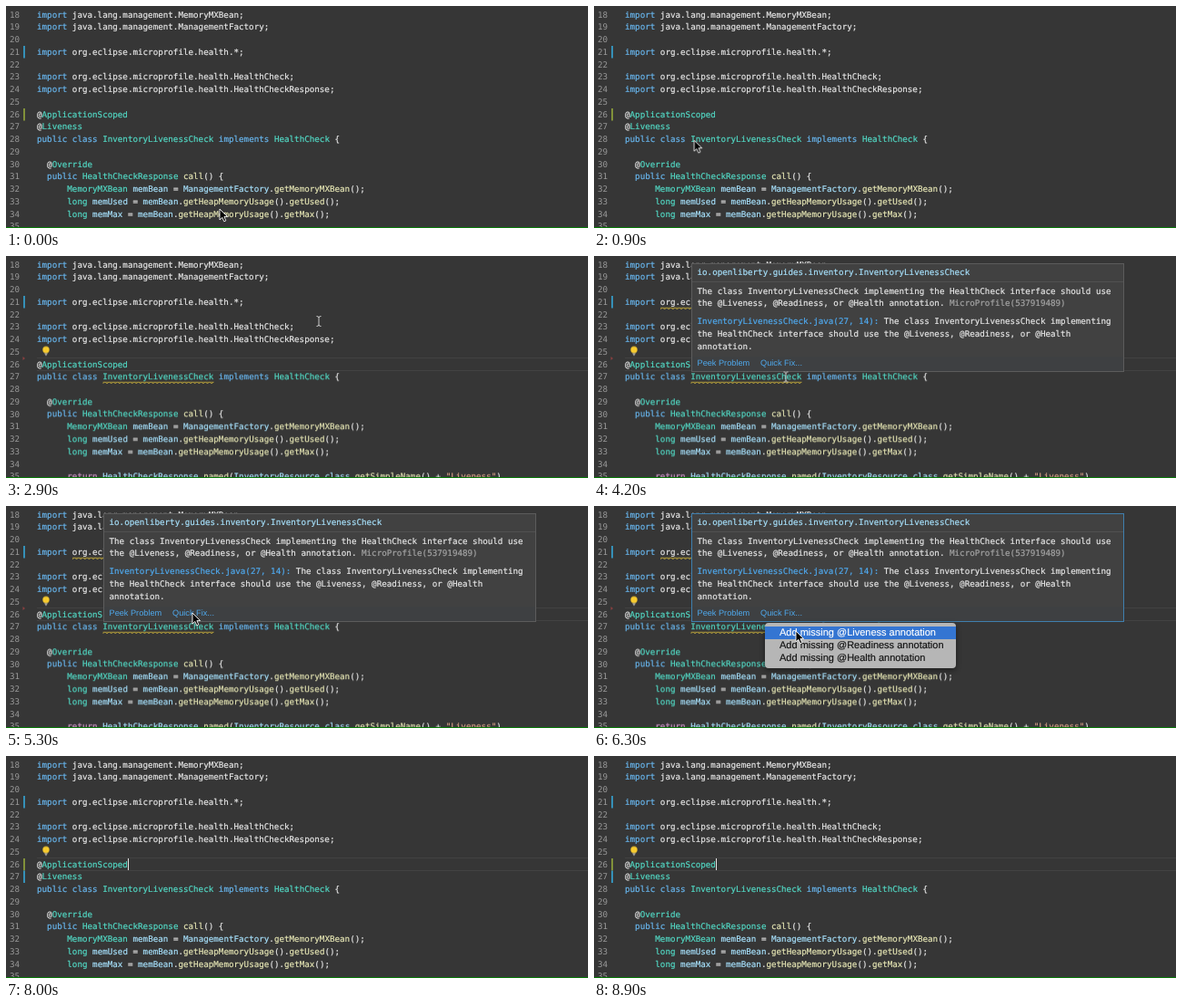
Recreate the animation shown at these times as an HTML page. Size 640x245 px, loop 9000 ms.

```html
<!DOCTYPE html>
<html lang="en">
<head>
<meta charset="utf-8">
<title>Quick fix in a Java editor</title>
<style>
  html, body { margin: 0; width: 100%; height: 100%; overflow: hidden; background: #363636; }
  #stage { position: relative; width: 100%; height: 100%; overflow: hidden; text-rendering: geometricPrecision; }
  pre, svg, .tip, .menu, .edge { position: absolute; margin: 0; }
  svg { left: 0; top: 0; }
  pre { font: 9.22px/13.75px "DejaVu Sans Mono", monospace; color: #e6e6e6; -webkit-text-stroke: .2px; }
  .code { left: 34px; top: 3.5px; }
  .nums { left: 4px; top: 3.5px; color: #999; -webkit-text-stroke: 0; }
  .edge { left: 0; right: 0; bottom: 0; height: 1px; background: #067a06; }

  /* syntax: keyword, type, method, variable, string, control */
  b, i, u, s, q, .ctrl { font: inherit; text-decoration: none; quotes: none; }
  b { color: #68b6ee; }
  i { color: #52d8c4; }
  u { color: #e6e6b4; }
  s { color: #a6e0fb; }
  q { color: #dba388; }
  .ctrl { color: #cf94c8; }

  .tip { left: 107px; top: 8px; width: 474px; height: 118px; background: #414141; border: 1px solid #5c5c5c; }
  .tip pre { left: 5.5px; }
  .tip hr { position: absolute; left: 0; width: 100%; margin: 0; border: 0; height: 1px; background: #515151; }
  .tip b { color: #4fa9ee; }
  .tip em { font-style: normal; color: #a4a4a4; }
  .bar { position: absolute; left: 0; right: 0; bottom: 0; height: 16px; background: #3e4042; font: 9.2px/15.4px "Liberation Sans", Arial, sans-serif; color: #4fa9ee; }
  .bar span { position: absolute; left: 5.5px; }
  .bar span + span { left: 75px; }

  .menu { left: 188px; top: 129px; width: 210px; height: 46px; padding: 3.5px 0 0; border-radius: 4px; background: #b6b6b6; box-shadow: 0 2px 6px #0007; font: 11px/14.4px "Liberation Sans", Arial, sans-serif; color: #111; -webkit-text-stroke: .15px; }
  .menu div { padding-left: 16px; }
  .menu .pick { background: #3475d2; color: #fff; }

  /* every track shares the same nine-second clock */
  .track { animation: 9s step-end infinite; }
  .body { animation-name: body; }
  @keyframes body { 0%, 77.77% { transform: none } 25.55% { transform: translateY(-13.75px) } }
  .note { animation-name: note; }
  @keyframes note { 0%, 77.77% { opacity: 1 } 23.33% { opacity: 0 } }
  .added { animation-name: added; }
  @keyframes added { 0% { opacity: 0 } 77.77%, 100% { opacity: 1 } }
  .mark { animation-name: mark; }
  @keyframes mark { 0%, 77.77% { opacity: 1 } 25.55% { opacity: 0 } }
  .removed { animation-name: removed; }
  @keyframes removed { 0%, 77.77% { opacity: 0 } 25.55% { opacity: 1 } }
  .row { animation-name: row; }
  @keyframes row { 0% { opacity: 0 } 25.55%, 100% { opacity: 1 } }
  .select { animation: select 9s linear infinite; transform-origin: 84px 0; }
  @keyframes select {
    0%, 14.44% { transform: scaleX(0); animation-timing-function: steps(9) }
    18.88%, 23.33% { transform: scaleX(1); animation-timing-function: step-start }
    23.34%, 100% { transform: scaleX(0) }
  }
  .bulb { animation-name: bulb; }
  @keyframes bulb {
    0% { opacity: 0; transform: translate(44px, 117.5px) }
    20% { opacity: 1; transform: translate(44px, 117.5px) }
    25.55%, 100% { opacity: 1; transform: translate(44px, 103.5px) }
  }
  .caret { animation-name: caret; }
  @keyframes caret {
    0%, 31.1%, 90% { opacity: 0 }
    25.55%, 77.77%, 95.5%, 100% { opacity: 1 }
  }
  .warnClass { animation-name: warnClass; }
  @keyframes warnClass { 0%, 77.77% { opacity: 0 } 28.88% { opacity: 1 } }
  .warnImport { animation-name: warnImport; }
  @keyframes warnImport { 0%, 84.44% { opacity: 0 } 36.66% { opacity: 1 } }
  .tip { animation-name: tip; }
  @keyframes tip {
    0%, 77.77% { opacity: 0 }
    43.33% { opacity: 1; border-color: #5c5c5c }
    62.22% { opacity: 1; border-color: #3f7fae }
  }
  .menu { animation-name: menu; }
  @keyframes menu { 0%, 77.77% { opacity: 0 } 63.33% { opacity: 1 } }
  .arrow { animation-name: arrow; }
  @keyframes arrow { 0%, 54.44% { opacity: 1 } 12.22%, 77.77% { opacity: 0 } }
  .beam { animation-name: beam; }
  @keyframes beam { 0%, 54.44%, 87.77% { opacity: 0 } 12.22%, 77.77% { opacity: 1 } }
  .mouse { animation: mouse 9s ease-in-out infinite; }
  @keyframes mouse {
    0%, 4.44% { transform: translate(235px, 224px) }
    12.22%, 14.44% { transform: translate(85px, 133px) }
    18.88%, 26.66% { transform: translate(36px, 133px) }
    31.11%, 33.33% { transform: translate(344px, 72px) }
    41.11%, 52.22% { transform: translate(211px, 133.5px) }
    58.88%, 64.44% { transform: translate(205px, 118px) }
    68.88%, 76.66% { transform: translate(222px, 138px) }
    80%, 100% { transform: translate(338px, 168px) }
  }
</style>
</head>
<body>
<div id="stage">
  <svg width="640" height="245">
    <path class="track row" d="M34 112.5H640M34 126.5H640" stroke="#424242"/>
    <rect class="select" x="34" y="126.5" width="50" height="13.5" fill="#2d5f8c"/>
    <rect x="19" y="44" width="2" height="13.5" fill="#3590b8"/>
    <rect class="track mark" x="19" y="113" width="2" height="13.5" fill="#81913a"/>
    <rect class="track added" x="19" y="126.5" width="2" height="13.5" fill="#3590b8"/>
    <path class="track removed" d="M18.5 111V115L21 113Z" fill="#8c4040"/>
  </svg>

  <pre class="nums">18
19
20
21
22
23
24
25
26
27
28
29
30
31
32
33
34
35</pre>

  <pre class="code"><b>import</b> java.lang.management.MemoryMXBean;
<b>import</b> java.lang.management.ManagementFactory;

<b>import</b> org.eclipse.microprofile.health.*;

<b>import</b> org.eclipse.microprofile.health.HealthCheck;
<b>import</b> org.eclipse.microprofile.health.HealthCheckResponse;

@<i>ApplicationScoped</i>
<span class="track note">@<i>Liveness</i></span></pre>

  <pre class="code track body" style="top:141px"><b>public class</b> <i>InventoryLivenessCheck</i> <b>implements</b> <i>HealthCheck</i> {

  @<i>Override</i>
  <b>public</b> <i>HealthCheckResponse</i> <u>call</u>() {
      <i>MemoryMXBean</i> <s>memBean</s> = <s>ManagementFactory</s>.<u>getMemoryMXBean</u>();
      <i>long</i> <s>memUsed</s> = <s>memBean</s>.<u>getHeapMemoryUsage</u>().<u>getUsed</u>();
      <i>long</i> <s>memMax</s> = <s>memBean</s>.<u>getHeapMemoryUsage</u>().<u>getMax</u>();

      <span class="ctrl">return</span> <s>HealthCheckResponse</s>.<u>named</u>(<s>InventoryResource</s>.<s>class</s>.<u>getSimpleName</u>() + <q>"Liveness"</q>)</pre>

  <svg width="640" height="245">
    <defs>
      <pattern id="wave" width="4.6" height="2.4" patternUnits="userSpaceOnUse">
        <path d="M-.3 2.2L2.3 .4L4.9 2.2" fill="none" stroke="#d0b53c" stroke-width=".9"/>
      </pattern>
    </defs>
    <g class="track warnImport"><rect width="172" height="2.4" fill="url(#wave)" transform="translate(73 56.5)"/></g>
    <g class="track warnClass"><rect width="122" height="2.4" fill="url(#wave)" transform="translate(106.5 138.5)"/></g>
    <path class="track caret" d="M134.5 113V126" stroke="#e4e4e4"/>
    <g class="track bulb">
      <circle r="3.7" fill="#f7cb2d"/>
      <path d="M-1.6 4.2H1.6M-1 5.7H1" stroke="#c9c9c9" stroke-width=".9"/>
    </g>
  </svg>

  <div class="tip track">
    <pre style="top:2.8px"><s>io.openliberty.guides.inventory.InventoryLivenessCheck</s></pre>
    <hr style="top:19px">
    <pre style="top:23.7px">The class InventoryLivenessCheck implementing the HealthCheck interface should use
the @Liveness, @Readiness, or @Health annotation. <em>MicroProfile(537919489)</em></pre>
    <pre style="top:57.2px"><b>InventoryLivenessCheck.java(27, 14):</b> The class InventoryLivenessCheck implementing
the HealthCheck interface should use the @Liveness, @Readiness, or @Health
annotation.</pre>
    <div class="bar"><span>Peek Problem</span><span>Quick Fix...</span></div>
  </div>

  <div class="menu track">
    <div class="pick">Add missing @Liveness annotation</div>
    <div>Add missing @Readiness annotation</div>
    <div>Add missing @Health annotation</div>
  </div>

  <svg width="640" height="245">
    <g class="mouse">
      <path class="track arrow" d="M0 0V12L2.8 9.4L4.8 13.8L6.8 12.9L4.9 8.6H8.6Z" fill="#000" stroke="#fff" stroke-width=".9"/>
      <path class="track beam" d="M-2.5 -5.5Q0 -5.5 0 -4Q0 -5.5 2.5 -5.5M0 -4V4M-2.5 5.5Q0 5.5 0 4Q0 5.5 2.5 5.5" fill="none" stroke="#f2f2f2" stroke-width=".8"/>
    </g>
  </svg>
  <div class="edge"></div>
</div>
</body>
</html>
```
